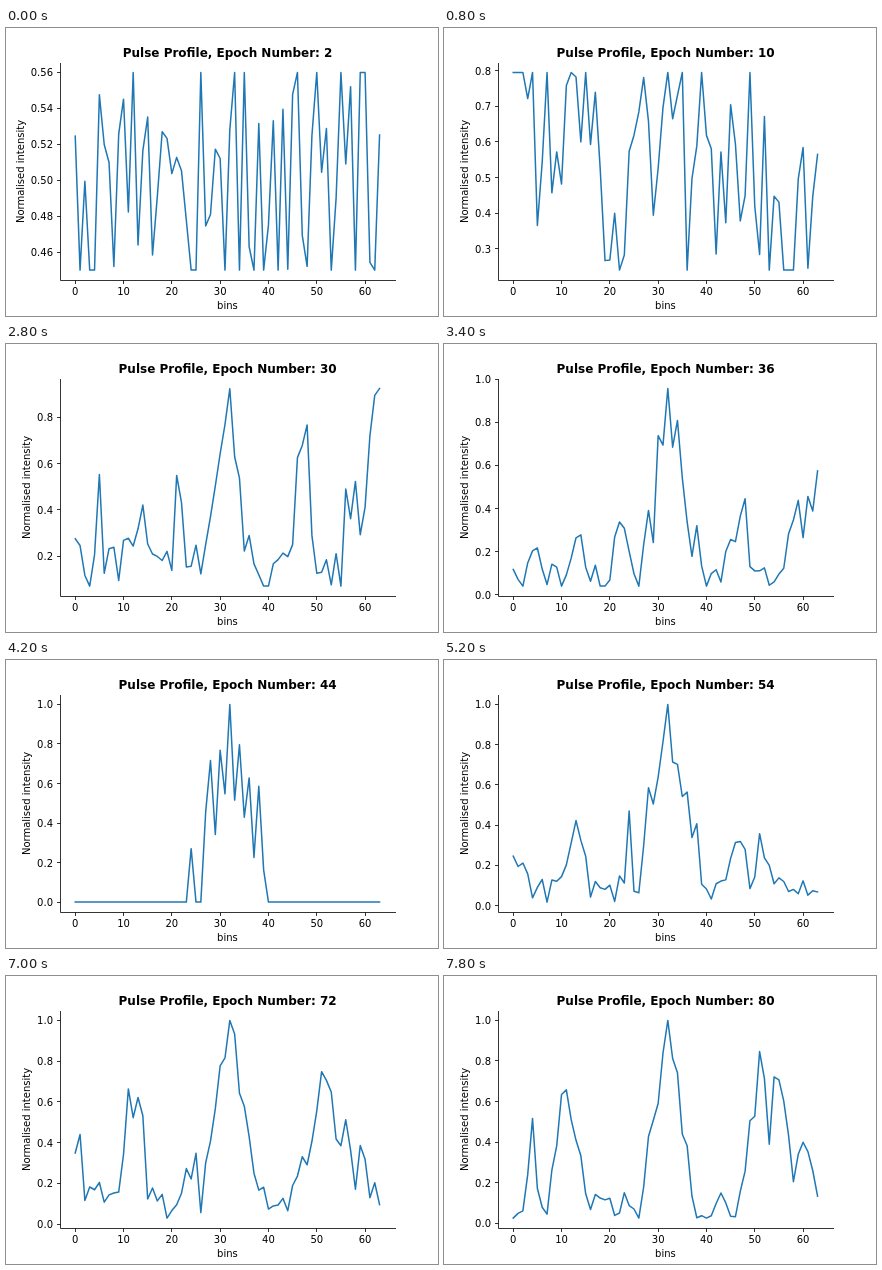
An HTML page that plays this animation: 432 by 288 pixels, repeating every 8000 ms.

```html
<!DOCTYPE html>
<html lang="en">
<head>
<meta charset="utf-8">
<title>Pulse profile</title>
<style>
  html, body { margin: 0; width: 100%; height: 100%; overflow: hidden; background: #fff; }
  svg { display: block; width: 432px; height: 288px; }
  text { font: 10px "DejaVu Sans", sans-serif; text-anchor: middle; }
  #title { font-weight: bold; font-size: 12px; }
  #yTicks text { text-anchor: end; }
  .axis path { fill: none; stroke: #000; stroke-width: .8; stroke-linecap: square; }
  .axis g path { stroke-linecap: butt; }
  #curve { fill: none; stroke: #1f77b4; stroke-width: 1.5; stroke-linejoin: round; stroke-linecap: square; }
</style>
</head>
<body>
<svg viewBox="0 0 432 288">
  <path id="curve"/>
  <g class="axis">
    <path d="M54.5 35.5V252.5H389.5"/>
    <g id="xTicks"></g>
    <g id="yTicks"></g>
  </g>
  <text id="title" x="221.6" y="29"></text>
  <text x="221.4" y="281">bins</text>
  <text id="yLabel">Normalised intensity</text>
</svg>
<script>
const STEP_MS = 200, STEPS = 40, BINS = 64;
const TOP = 44.44, BOTTOM = 242.12, LEFT = 69.22, BIN_WIDTH = 4.831;

// Peaks map a bin to a relative height; slope is the fall per bin on either side.
const stages = [
  { step: 0, lo: .45, hi: .56, floor: .4, slope: .4, rough: .8,
    peaks: { 6: .87, 12: 1, 26: .91, 32: .93, 49: .92, 59: .81 } },
  { step: 4, lo: .24, hi: .795, floor: .2, slope: .1, rough: .6,
    peaks: { 2: .95, 12: 1, 32: .92, 40: .8, 49: .77, 63: .62 } },
  { step: 10, lo: .025, hi: 1, floor: .1, slope: .2, rough: .25,
    peaks: { 3: .37, 11: .46, 32: 1, 39: .61, 43: .56, 58: .67 } },
  { step: 14, lo: .07, hi: .925, floor: .1, slope: .2, rough: .25,
    peaks: { 5: .35, 14: .53, 22: .53, 32: .98, 47: .82, 58: .69, 63: 1 } },
  { step: 21, lo: 0, hi: 1, floor: 0, slope: .4, rough: .1,
    peaks: { 24: .31, 28: .79, 30: .8, 32: 1, 34: .81, 36: .69, 38: .53 } },
  { step: 31, lo: .035, hi: 1, floor: .1, slope: .15, rough: .2,
    peaks: { 0: .64, 13: .67, 24: .48, 32: 1, 47: .55, 52: .62 } },
  { step: 39, lo: .025, hi: 1, floor: .06, slope: .17, rough: .15,
    peaks: { 4: .37, 11: .77, 32: 1, 51: .8, 55: .76, 60: .52 } }
];

const byId = id => document.getElementById(id);
const mix = (a, b, t) => a + (b - a) * t;
const binX = bin => LEFT + bin * BIN_WIDTH;

function random(seed) {
  let s = seed * 7919 + 17;
  return () => {
    s = (s + 0x6D2B79F5) | 0;
    let t = Math.imul(s ^ (s >>> 15), s | 1);
    t ^= t + Math.imul(t ^ (t >>> 7), t | 61);
    return ((t ^ (t >>> 14)) >>> 0) / 4294967296;
  };
}

const level = ({ floor, slope, peaks }, bin) => Math.max(floor,
  ...Object.entries(peaks).map(([at, height]) => height - slope * Math.abs(bin - at)));

function profileAt(step) {
  const i = stages.findLastIndex(s => s.step <= step);
  const a = stages[i], b = stages[i + 1] ?? a;
  const t = a === b ? 0 : (step - a.step) / (b.step - a.step);
  const between = key => mix(a[key], b[key], t);
  const next = random(step), rough = between("rough");

  // Scatter fades at the summit and in silence.
  const raw = Array.from({ length: BINS }, (_, bin) => {
    const v = mix(level(a, bin), level(b, bin), t);
    return v + (next() * 2 - 1) * rough * 2 * Math.sqrt(v * (1 - v));
  }).map(v => Math.min(1, Math.max(0, v)));

  const min = Math.min(...raw), max = Math.max(...raw);
  const lo = between("lo"), hi = between("hi");
  return { lo, hi, values: raw.map(v => mix(lo, hi, (v - min) / (max - min))) };
}

function draw(step) {
  const { lo, hi, values } = profileAt(step);
  const pad = (hi - lo) * .05;
  const toY = v => mix(BOTTOM, TOP, (v - lo) / (hi - lo));
  const gap = [.01, .02, .05, .1, .2].find(g => (hi - lo + 2 * pad) / g <= 9);
  const digits = gap < .1 ? 2 : 1;

  let ticks = "";
  for (let n = Math.ceil((lo - pad) / gap); n * gap <= hi + pad; n++) {
    const y = toY(n * gap);
    ticks += `<path d="M54.5 ${Math.floor(y) + .5}h-3.5"/>` +
      `<text x="47" y="${Math.round(y + 4)}">${(n * gap).toFixed(digits)}</text>`;
  }
  byId("yTicks").innerHTML = ticks;
  byId("yLabel").setAttribute("transform", `translate(${digits === 2 ? 18 : 24} 143.5) rotate(-90)`);
  byId("title").textContent = `Pulse Profile, Epoch Number: ${step * 2 + 2}`;
  byId("curve").setAttribute("d",
    "M" + values.map((v, bin) => `${binX(bin).toFixed(2)} ${toY(v).toFixed(2)}`).join("L"));
}

for (let bin = 0; bin <= 60; bin += 10) {
  const x = binX(bin);
  byId("xTicks").innerHTML += `<path d="M${Math.floor(x) + .5} 252.5v3.5"/><text x="${x}" y="267">${bin}</text>`;
}

const start = performance.now();
let shown = -1;
function tick() {
  const step = Math.floor((performance.now() - start) / STEP_MS) % STEPS;
  if (step !== shown) draw(shown = step);
  requestAnimationFrame(tick);
}
tick();
</script>
</body>
</html>
```
